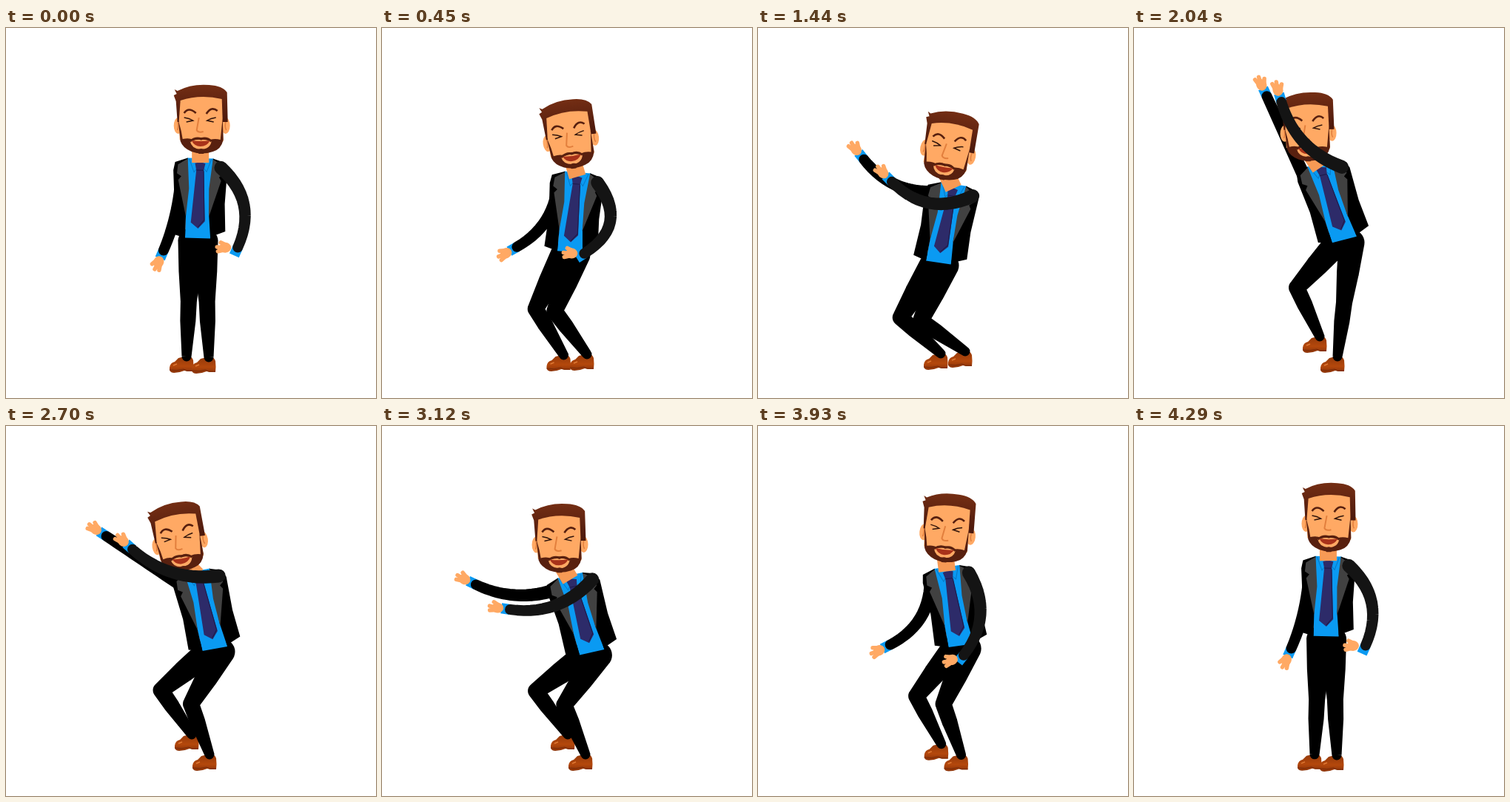
These frames come from a looping animation (500 by 500 pixels, 4320 ms). An HTML page:

```html
<!DOCTYPE html>
<html lang="en">
<head>
<meta charset="utf-8">
<title>Dancing man</title>
<style>
html, body { margin: 0; width: 100%; height: 100%; overflow: hidden; background: #fff; }
svg { display: block; width: 100vw; height: 100vh; }
</style>
</head>
<body>
<svg viewBox="0 0 500 500">
  <defs>
    <linearGradient id="hairTone" x2="0" y2="1">
      <stop offset="0" stop-color="#742e14"/><stop offset="1" stop-color="#4a180c"/>
    </linearGradient>
    <linearGradient id="shoeTone" x2="0" y2="1">
      <stop offset="0" stop-color="#93390a"/><stop offset=".6" stop-color="#b4480c"/><stop offset="1" stop-color="#8a3208"/>
    </linearGradient>
    <g id="shoe">
      <path d="M-4-9Q2-11 8-11Q14-12 16-6Q17 2 16 9H8L4 8Q-3 11-10 11Q-17 11-16 4Q-15-3-9-4Z" fill="url(#shoeTone)"/>
      <path d="M-16 7Q-6 9 3 6L7 8H16" fill="none" stroke="#7a2b08"/>
      <path d="M-11 1l5-2" stroke="#e07a35" stroke-width="1.5"/>
    </g>
    <g id="hand" fill="none" stroke="#ffa964" stroke-linecap="round">
      <ellipse cx="-1" rx="8" ry="7" fill="#ffa964" stroke="none"/>
      <path d="M0-3L9-5M2 0L10 1M-1 4L5 7" stroke-width="5.5"/>
    </g>
  </defs>

  <path id="cuffL" stroke="#0a9af2" stroke-width="14"/>
  <use id="handL" href="#hand"/>
  <path id="armL"/>
  <use id="shoeL" href="#shoe"/>
  <use id="shoeR" href="#shoe"/>
  <path id="legL"/>
  <path id="legR"/>

  <g id="torso">
    <path d="M-18-1L18-1L17 107H-17Z" fill="#0a9af2"/>
    <path d="M-15 0L-8 18L0 7L9 17L15 0" fill="none" stroke="#0878c4"/>
    <path d="M-7 6L0 4L7 6L5 15L9 84L0 94L-10 86L-5 15Z" fill="#2d2b69"/>
    <path d="M-5 15H5M5 16L8 82L0 92" fill="none" stroke="#1b1a48"/>
    <path d="M-17-1L-34 5L-36 16L-33 60L-35 102L-17 107L-17 75L-19 20Z"/>
    <path d="M17-1L33 4L37 14L35 60L37 97L17 105L14 74L18 20Z"/>
    <path d="M-17 0L-30 8L-31 20L-25 24L-29 29L-17 78L-14 40Z" fill="#414141"/>
    <path d="M17 0L29 8L31 20L26 24L29 29L14 78L13 40Z" fill="#414141"/>
  </g>

  <path id="neck" stroke="#f79a55" stroke-width="23"/>
  <g id="head">
    <ellipse cx="-30" cy="7" rx="6" ry="11" fill="#ffa964"/>
    <ellipse cx="34" cy="7" rx="6" ry="11" fill="#ffa964"/>
    <path d="M-31-1Q-29 8-31 13M35-1Q32 8 35 13" fill="none" stroke="#e27f3d" stroke-width="1.5"/>
    <path d="M-35-42L-31-40Q-12-50 12-48Q30-47 36-38L37 2H-31L-33-26L-36-34L-32-36Z" fill="url(#hairTone)"/>
    <path d="M-27-27Q0-36 29-29L31 28Q2 50-28 26L-29 0Z" fill="#ffa964"/>
    <g transform="translate(0 4)" fill="#58200f">
      <path d="M-30-5L-26 10L-24 21Q-15 19-10 22Q0 16 13 22Q20 20 27 22L30-7L31 22Q28 35 17 38Q2 43-12 38Q-24 33-27 24Z"/>
      <path d="M-14 24Q0 19 15 24Q13 35 0 35Q-12 34-14 24Z" fill="#ffa964"/>
      <path d="M-14 24Q-6 18 1 21Q8 18 15 24" fill="none" stroke="#58200f" stroke-width="3"/>
      <path d="M-12 23Q0 25 13 23Q9 31 0 31Q-8 31-12 23Z" fill="#a8321a"/>
      <path d="M-6 37Q1 31 8 37L4 41H-2Z"/>
    </g>
    <path d="M-2-4L-5 13Q-3 17 4 15" fill="none" stroke="#e27f3d" stroke-width="2"/>
    <path d="M-22-10Q-16-19-6-10M8-9Q15-20 23-13" fill="none" stroke="#58200f" stroke-width="2.6"/>
    <path d="M-22-4Q-15-3-10 0L-19 2M21-4Q14-3 9 0L18 2" fill="none" stroke="#30140b" stroke-width="1.5"/>
  </g>

  <path id="cuffR" stroke="#0a9af2" stroke-width="14"/>
  <use id="handR" href="#hand"/>
  <path id="armR" fill="#141414"/>
</svg>
<script>
const LOOP = 4320, STEP = 30, RAD = Math.PI / 180;
const TORSO = 106, NECK = 52, THIGH = 82, SHIN = 73;

// Left and right shoe positions.
const together = [237, 455, 267, 456], slid = [240, 451, 273, 448], apart = [244, 428, 268, 455];

// head: turn, nod; arms: angle, reach from the shoulder; flex: bend of the right wrist.
const stand = { waist: [259, 283], lean: 2, head: [0, 0], left: [103, 113], right: [78, 110], feet: together, flex: 65 };
const crouchLow = { waist: [250, 320], lean: 8, head: [-12, -26], left: [159, 96], right: [141, 86], feet: slid, flex: 0 };
const crouchHigh = { waist: [244, 316], lean: 11, head: [11, -9], left: [205, 105], right: [190, 111], feet: slid, flex: 0 };
const reachUp = { waist: [284, 285], lean: -18, head: [-1, -20], left: [245, 123], right: [227, 120], feet: apart, flex: 0 };
const squatHigh = { waist: [282, 300], lean: -13, head: [-9, -30], left: [213, 121], right: [197, 122], feet: apart, flex: 0 };
const squatLow = { waist: [285, 307], lean: -19, head: [9, -3], left: [152, 94], right: [120, 113], feet: apart, flex: 0 };

const flat = pose => Object.values(pose).flat();
const mix = (a, b, u) => a.map((v, i) => v + (b[i] - v) * u);

// A repeated pose is a hold.
const keys = [
  [0, flat(stand)], [900, flat(crouchLow)], [1440, flat(crouchHigh)],
  [1640, mix(flat(crouchHigh), flat(squatHigh), .75)],
  [2040, flat(reachUp)], [2170, flat(reachUp)], [2700, flat(squatHigh)], [3570, flat(squatLow)]
];

const set = (id, name, value) => document.getElementById(id).setAttribute(name, value);
const place = (id, x, y, turn = 0) => set(id, 'transform', `translate(${x} ${y}) rotate(${turn})`);
const polar = ([x, y], angle, r) => [x + r * Math.cos(angle * RAD), y + r * Math.sin(angle * RAD)];
const angleTo = ([ax, ay], [bx, by]) => Math.atan2(by - ay, bx - ax) / RAD;

// Key at any index of the endless loop.
function keyAt(i) {
  const n = keys.length, lap = Math.floor(i / n), [time, pose] = keys[i - lap * n];
  return { time: time + lap * LOOP, pose };
}

// Monotone cubic interpolation between neighbouring poses.
function poseAt(t) {
  const i = keys.findLastIndex(k => k[0] <= t);
  const k = [-1, 0, 1, 2].map(d => keyAt(i + d));
  const span = k[2].time - k[1].time, u = (t - k[1].time) / span;
  const blend = (a, b) => a * b <= 0 ? 0 : 2 * a * b / (a + b);
  return k[1].pose.map((a, c) => {
    const slope = j => (k[j + 1].pose[c] - k[j].pose[c]) / (k[j + 1].time - k[j].time);
    const b = k[2].pose[c];
    const m0 = blend(slope(0), slope(1)) * span, m1 = blend(slope(1), slope(2)) * span;
    return a + u * (m0 + u * (3 * (b - a) - 2 * m0 - m1 + u * (2 * (a - b) + m0 + m1)));
  });
}

// Outline of a chain of [x, y, radius] joints.
function limb(joints) {
  let d = '';
  joints.forEach(([x, y, r], i) => {
    d += `M${x + r} ${y}a${r} ${r} 0 1 0 ${-2 * r} 0a${r} ${r} 0 1 0 ${2 * r} 0Z`;
    if (!i) return;
    const [px, py, pr] = joints[i - 1], len = Math.hypot(x - px, y - py) || 1;
    const nx = (py - y) / len, ny = (x - px) / len;
    d += `M${px + nx * pr} ${py + ny * pr}L${x + nx * r} ${y + ny * r}` +
      `L${x - nx * r} ${y - ny * r}L${px - nx * pr} ${py - ny * pr}Z`;
  });
  return d;
}

// The nearer the wrist is to the shoulder, the further the elbow hangs out.
function drawArm(side, shoulder, angle, reach, slack, flex) {
  const wrist = polar(shoulder, angle, reach);
  const elbow = polar(mix(shoulder, wrist, .5), angle - 90, slack);
  const joints = [];
  for (let u = 0; u < 1.01; u += 1 / 14) {
    joints.push([...mix(mix(shoulder, elbow, u), mix(elbow, wrist, u), u), 9 - 2 * u]);
  }
  const aim = angleTo(elbow, wrist);
  set('arm' + side, 'd', limb(joints));
  set('cuff' + side, 'd', `M${wrist}L${polar(wrist, aim, 12)}`);
  place('hand' + side, ...polar(wrist, aim + flex, 18), aim + flex);
}

// Two-bone leg whose knee bends to the left.
function drawLeg(side, hip, x, y) {
  const ankle = [x + 7, y - 11];
  const dist = Math.min(Math.hypot(ankle[0] - hip[0], ankle[1] - hip[1]), THIGH + SHIN);
  const bend = Math.acos((THIGH ** 2 + dist ** 2 - SHIN ** 2) / (2 * THIGH * dist)) / RAD;
  const knee = polar(hip, angleTo(hip, ankle) + bend, THIGH);
  set('leg' + side, 'd', limb([[...hip, 17.5], [...mix(hip, knee, .5), 15], [...knee, 11],
    [...mix(knee, ankle, .35), 10.5], [...ankle, 6.5]]));
  place('shoe' + side, x, y);
}

function draw(t) {
  const [wx, wy, lean, turn, nod, angleL, reachL, angleR, reachR, lx, ly, rx, ry, flex] = poseAt(t);
  const neck = polar([wx, wy], lean - 90, TORSO);
  const head = polar(neck, nod - 90, NECK);
  const tilt = lean * .8, c = Math.cos(tilt * RAD), s = Math.sin(tilt * RAD);
  const onChest = (x, y) => [neck[0] + x * c - y * s, neck[1] + x * s + y * c];

  set('torso', 'transform', `matrix(${[c, s, -Math.sin(lean * RAD), Math.cos(lean * RAD), ...neck]})`);
  set('neck', 'd', `M${polar(head, turn + 90, 28)}L${neck[0]} ${neck[1] + 5}`);
  place('head', ...head, turn);
  drawLeg('L', [wx - 9, wy + 5], lx, ly);
  drawLeg('R', [wx + 10, wy + 5], rx, ry);
  drawArm('L', onChest(-24, 14), angleL, reachL, 2 * Math.max(0, 118 - reachL), 0);
  drawArm('R', onChest(28, 11), angleR, reachR, 150 - reachR, flex);
}

const start = performance.now();
function tick() {
  const t = (performance.now() - start) % LOOP;
  draw(Math.floor(t / STEP) * STEP);
  requestAnimationFrame(tick);
}
tick();
</script>
</body>
</html>
```
